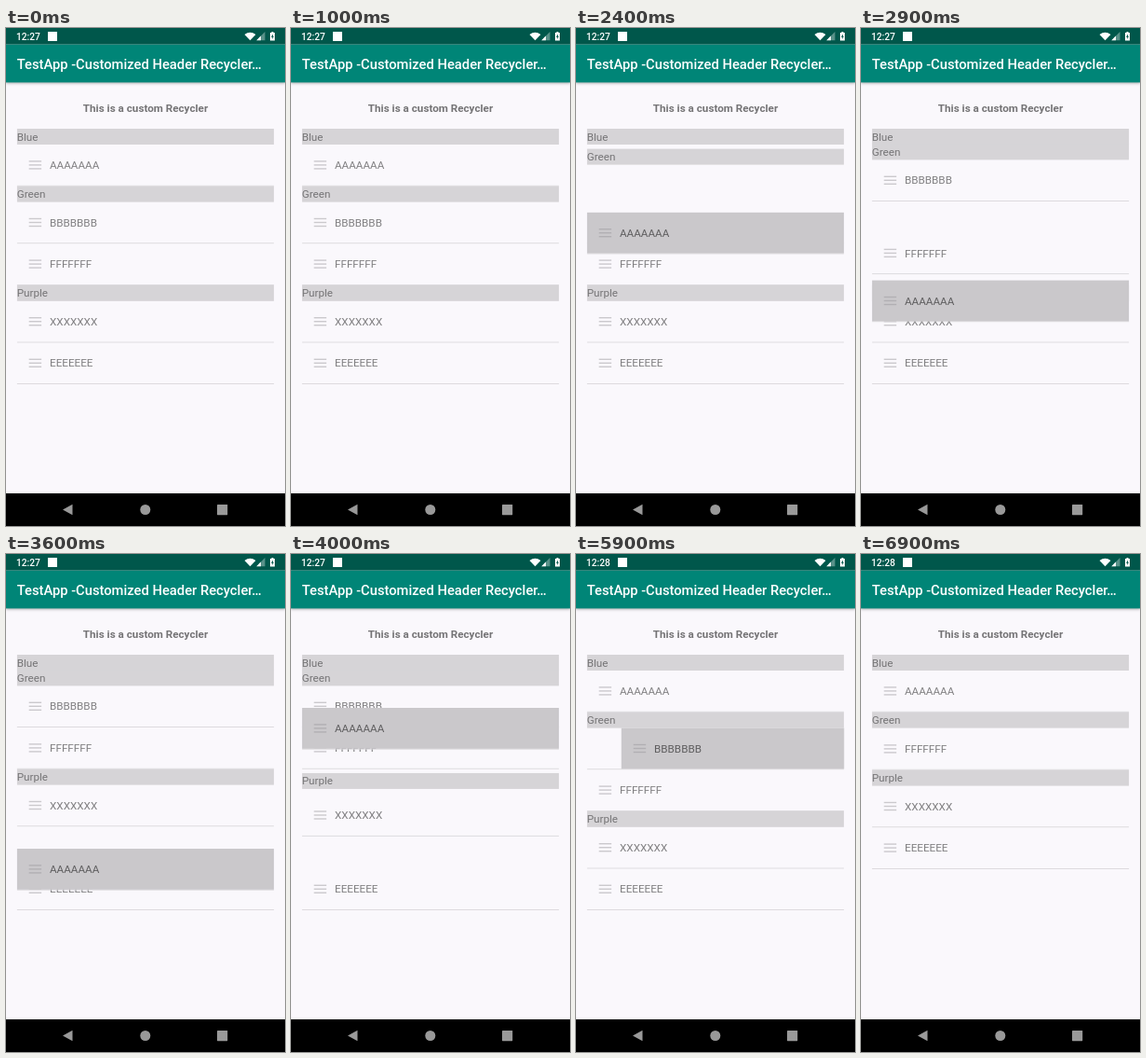
Recreate the animation shown at these times as an HTML page. Size 300 by 534 pixels, loop 8 s.

```html
<!DOCTYPE html>
<html lang="en">
<head>
<meta charset="utf-8">
<title>Custom Recycler</title>
<style>
  html, body { margin: 0; width: 100%; height: 100%; overflow: hidden; background: #faf8fc; }
  svg { display: block; }
  text { font: 11.68px Roboto, sans-serif; fill: #757476; white-space: pre; }
  #sub { font-weight: bold; text-anchor: middle; }
  #clock { font-size: 10.2px; }
  #title { font-size: 14.76px; }
  #clock, #title { font-weight: 500; fill: #fff; }
  #bar { filter: drop-shadow(0 1px 1.5px rgba(0, 0, 0, .3)); }
  .head, .line { fill: #d6d4d7; }
  .back { fill: none; }
  .grip { fill: rgba(150, 148, 152, .47); }
  .row text { fill: rgba(0, 0, 0, .49); }
  .held .back { fill: #cac8cb; }
  .held text { fill: rgba(0, 0, 0, .54); }
</style>
</head>
<body>
<svg width="300" height="534">
  <rect id="bar" y="17.5" width="300" height="40.9" fill="#008577"/>
  <rect width="300" height="17.5" fill="#00574b"/>
  <text id="clock" x="10.9" y="13"></text>
  <text id="title" x="11.7" y="43.8">TestApp -Customized Header Recycler…</text>
  <text id="sub" x="150" y="90">This is a custom Recycler</text>
  <g fill="#fff">
    <rect x="45" y="4" width="10" height="10"/>
    <path d="M256.5 7Q262.5 2.6 268.5 7L262.5 13.3Z"/>
    <path d="M278.5 4V13.3H269.3Z" opacity=".35"/>
    <path d="M274 8.6V13.3H269.3Z"/>
    <path d="M284 5H285.5V4H287.5V5H289V13.5H284Z"/>
    <path d="M287 6.5L285 9.8H286.3V12L288 8.8H287Z" fill="#00574b"/>
  </g>
  <svg id="list" x="11.7" y="108" width="276.6" height="391"></svg>
  <rect y="499" width="300" height="35"/>
  <g fill="#999">
    <path d="M61 516.5L71.5 510.8V522.2Z"/>
    <circle cx="149.8" cy="516.5" r="5.5"/>
    <rect x="227" y="511" width="11.2" height="11.2" rx=".6"/>
  </g>
</svg>
<script>
const LOOP = 8000, STEP = 100;
const HEAD = 17, ROW = 44.6, WIDTH = 276.6;
const LIFT = 45.2, CLOSE = 44.2;   // gap filled after a drag, after a removal
const MOVE = 250, LAG = 185;       // item animation, delay after being passed
const PICK = 1900, PEAK = 3500, SWIPE = 5800, GONE = 6200;

// Finger travel as [time, offset].
const DRAG = [[PICK, 0], [2900, 145.6], [3200, 191], [PEAK, 206], [3600, 191],
              [3850, 61], [4300, -2], [4800, -8.8], [5300, 0]];

const list = document.getElementById("list");
const clock = document.getElementById("clock");

function rect(cls, x, y, w, h) {
  return `<rect class="${cls}" x="${x}" y="${y}" width="${w}" height="${h}"/>`;
}

function headMarkup(label) {
  return rect("head", 0, 0, WIDTH, HEAD) + `<text y="12.5">${label}</text>`;
}

function rowMarkup(label) {
  const grip = [17.2, 21.2, 25.2].map(y => rect("grip", 13, y, 13.4, 1.4)).join("");
  return rect("line", 0, 43.8, WIDTH, .8) +
    `<g>${rect("back", 0, 0, WIDTH, 43.8)}${grip}<text x="35.3" y="26.1">${label}</text></g>`;
}

let end = 0;
const items = ["Blue", "AAAAAAA", "Green", "BBBBBBB", "FFFFFFF", "Purple", "XXXXXXX", "EEEEEEE"].map(label => {
  const isHead = /[a-z]/.test(label), height = isHead ? HEAD : ROW;
  const el = document.createElementNS("http://www.w3.org/2000/svg", "g");
  el.setAttribute("class", isHead ? "" : "row");
  el.innerHTML = isHead ? headMarkup(label) : rowMarkup(label);
  list.append(el);
  end += height;
  return { el, y: end - height, bottom: end };
});
const dragged = items[1], swiped = items[3];

function ease(t, start) {
  const p = Math.min(1, Math.max(0, (t - start) / MOVE));
  return (1 - Math.cos(Math.PI * p)) / 2;
}

function drag(t) {
  const k = DRAG.findIndex(key => t < key[0]);
  if (k < 1) return 0;
  const [t0, v0] = DRAG[k - 1], [t1, v1] = DRAG[k];
  return v0 + (v1 - v0) * (t - t0) / (t1 - t0);
}

// First moment from the given time when the dragged row meets the test.
function when(from, test) {
  for (let t = from; t < SWIPE; t += 5) if (test(drag(t))) return t + LAG;
  return Infinity;
}

// Items step up once the dragged row is below them and back once it is above.
for (const item of items.slice(2)) {
  item.up = when(PICK, d => d > item.bottom - dragged.bottom);
  item.down = item.up < Infinity ? when(PEAK, d => d < item.y - LIFT - dragged.y) : Infinity;
}

function hold(item, on) {
  item.el.classList.toggle("held", on);
  if (on && list.lastChild !== item.el) list.append(item.el);
}

function draw(t) {
  items.forEach((item, n) => {
    let y = item.y;
    if (n > 1) y -= LIFT * (ease(t, item.up) - ease(t, item.down));
    if (n > 3) y -= CLOSE * ease(t, GONE - 50);
    if (item === dragged) y += drag(t);
    item.el.setAttribute("transform", `translate(0 ${y})`);
  });
  hold(dragged, t >= PICK && t <= SWIPE);
  hold(swiped, t > SWIPE);
  const x = WIDTH * Math.max(0, (t - SWIPE) / (GONE - SWIPE)) ** 1.45;
  swiped.el.lastChild.setAttribute("transform", `translate(${x} 0)`);
  swiped.el.setAttribute("visibility", t < GONE ? "visible" : "hidden");
  clock.textContent = t < 4600 ? "12:27" : "12:28";
}

const begin = performance.now();
function tick() {
  const t = (performance.now() - begin) % LOOP;
  draw(t - t % STEP);
  requestAnimationFrame(tick);
}
tick();
</script>
</body>
</html>
```
